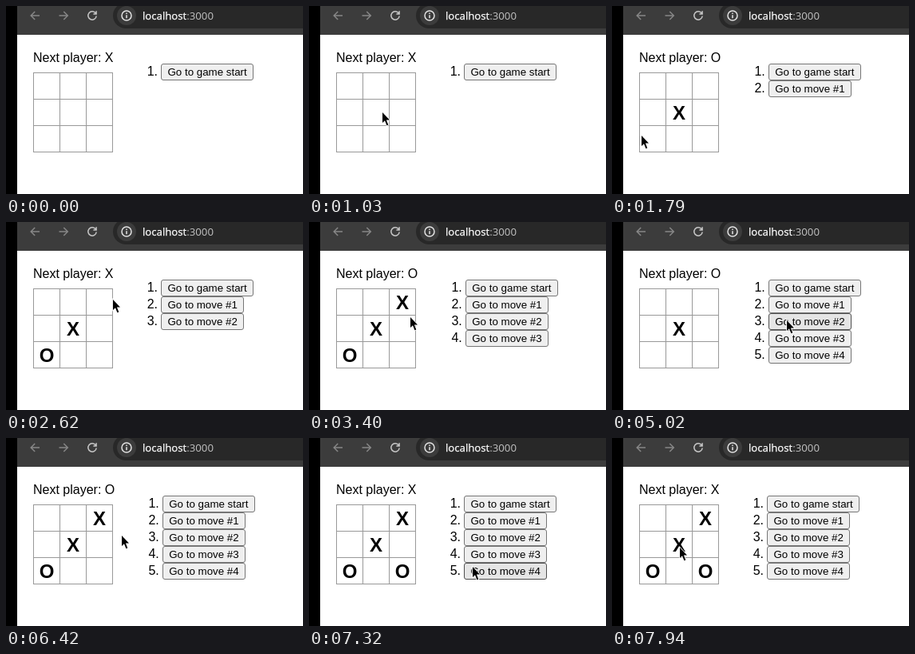
Animation of 372 by 235 pixels, one loop 8000 ms. Source, as an HTML page:

```html
<!DOCTYPE html>
<html lang="en">
<head>
<meta charset="utf-8">
<title>Tic-tac-toe history</title>
<style>
  html, body { margin: 0; width: 100%; height: 100%; overflow: hidden; background: #fff; }
  svg { display: block; }
  text { font-family: "Liberation Sans", Arial, sans-serif; font-size: 16px; fill: #000; white-space: pre; }
  .mark { font-size: 24px; font-weight: bold; text-anchor: middle; }
  .label { font-size: 13.333px; }
  .url { font-family: "Open Sans", sans-serif; font-size: 13.2px; fill: #c3c3c3; }
  .url .host { fill: #fff; stroke: #fff; stroke-width: 0.25; }
  .icon { fill: none; stroke-width: 1.5; }
  .btn { fill: #efefef; stroke: #767676; }
  .btn.hover { fill: #e5e5e5; stroke: #4f4f4f; }
  .btn.active { fill: #f5f5f5; stroke: #8d8d8d; }
</style>
</head>
<body>
<svg width="372" height="235" viewBox="0 0 372 235">
  <rect width="372" height="235" fill="#fff"/>
  <rect x="14" width="358" height="36" fill="#3c3c3c"/>
  <rect x="134" y="-4" width="280" height="32" rx="16" fill="#282828"/>
  <rect width="14" height="235" fill="#000"/>
  <g class="icon" stroke="#868686">
    <path d="M42 12H31.500M36.200 7L31.200 12L36.200 17"/>
    <path d="M66.500 12H77M72.300 7L77.300 12L72.300 17"/>
  </g>
  <path class="icon" stroke="#c7c7c7" d="M112.300 9A5.200 5.200 0 1 0 113.200 12.500M113.100 6.300V10H109.400"/>
  <circle cx="151" cy="12" r="12" fill="#3c3c3c"/>
  <g class="icon" stroke="#e3e3e3">
    <circle cx="151" cy="12" r="6"/>
    <path d="M151 11.200V15.200M151 8.400V9.900"/>
  </g>
  <text class="url" x="171" y="17"><tspan class="host">localhost</tspan>:3000</text>
  <text id="status" x="34" y="70"></text>
  <path id="grid" fill="none" stroke="#999"/>
  <g id="marks"></g>
  <g id="list"></g>
  <path id="cursor" d="M0 0V13L3 10.300L5.400 16.300L7.300 15.500L4.900 9.600H9Z"
        fill="#000" stroke="#fff" stroke-width="1.600" paint-order="stroke"/>
</svg>
<script>
  const LOOP = 8000, CELL = 33, ROW = 21, TOP = 72;
  const PRESS = 70;                      // how long a button stays down

  // Spots are centres of cells and buttons, with an offset
  const cell = (i, dx, dy) => ({ cell: i, x: 51 + i % 3 * CELL + dx, y: 100 + Math.floor(i / 3) * CELL + dy });
  const row = (i, dx, dy) => ({ row: i, x: 217 + dx, y: TOP + (i + 0.5) * ROW + dy });

  const keys = [], plays = [], clicks = [];
  const states = [{ t: 0, shown: 0, made: 0 }];

  function move(t, spot, bow = 0) {
    keys.push({ t, spot, bow });
  }

  function wait(t) {
    move(t, keys[keys.length - 1].spot);
  }

  function click(t) {
    wait(t);
    const { spot } = keys[keys.length - 1];
    if ("cell" in spot) plays.push(spot.cell);
    const made = plays.length;
    states.push({ t, made, shown: spot.row ?? made });
    clicks.push(t);
  }

  move(400, { x: 247, y: 202 });
  move(1160, cell(4, -5, -2), -14);
  click(1300);
  move(1790, cell(6, -14, -4), 22);
  click(2130);
  move(2620, cell(2, 17, -3));
  wait(2820);
  move(2890, cell(2, 12, -3));
  click(3090);
  move(3890, cell(8, 6, -3));
  click(4130);
  move(4700, row(1, 8, 2));
  click(4860);
  move(5020, row(2, 2, -2));
  move(5210, row(4, 0, -8));
  wait(5480);
  move(5550, row(3, 0, 4));
  click(5880);
  move(6080, row(3, -6, 0));
  wait(6280);
  move(6420, { x: 145, y: 122 });
  move(6600, cell(4, 0, 8));
  move(6980, row(4, 0, -7));
  click(7180);
  move(7940, cell(4, 1, 4), 14);

  const $ = id => document.getElementById(id);

  function add(parent, tag, attrs, text = "") {
    const el = document.createElementNS("http://www.w3.org/2000/svg", tag);
    for (const key in attrs) el.setAttribute(key, attrs[key]);
    el.textContent = text;
    parent.appendChild(el);
    return el;
  }

  let grid = "";
  for (let i = 0; i < 4; i++) {
    const d = i * CELL + 0.5;
    grid += `M34 ${83 + d}h100M${34 + d} 83v100`;
  }
  $("grid").setAttribute("d", grid);

  const marks = plays.map((n, i) => {
    const { x, y } = cell(n, 0, 9);
    return add($("marks"), "text", { class: "mark", x, y }, i % 2 ? "O" : "X");
  });

  const rows = [...Array(plays.length + 1).keys()].map(i => {
    const g = add($("list"), "g", {});
    const y = TOP + i * ROW, width = i ? 104 : 116;
    const num = add(g, "text", { y: y + 15 }, i + 1 + ".");
    const box = add(g, "rect", { y: y + 0.5, width: width - 1, height: ROW - 1, rx: 2.5 });
    const label = add(g, "text", { class: "label", y: y + 15 }, i ? "Go to move #" + i : "Go to game start");
    return { g, num, box, label, y, width };
  });

  function pointer(t) {
    if (t < keys[0].t) return [-50, -50];
    const i = keys.findIndex(k => k.t > t);
    const b = keys[i < 0 ? keys.length - 1 : i];
    if (i < 0) return [b.spot.x, b.spot.y].map(Math.round);
    const a = keys[i - 1];
    const k = (t - a.t) / (b.t - a.t), e = k * k * (3 - 2 * k);
    const mix = axis => a.spot[axis] + (b.spot[axis] - a.spot[axis]) * e;
    return [mix("x"), mix("y") + b.bow * Math.sin(Math.PI * e)].map(Math.round);
  }

  function draw(t) {
    const { shown, made } = states.filter(s => s.t <= t).pop();
    const [px, py] = pointer(t);
    const pressed = clicks.some(c => t >= c - PRESS && t < c);
    const left = shown % 2 ? 196.26 : 194.48;   // the list follows the status width
    const edge = Math.floor(left);

    $("status").textContent = "Next player: " + (shown % 2 ? "O" : "X");
    marks.forEach((m, i) => m.setAttribute("visibility", i < shown ? "visible" : "hidden"));
    rows.forEach((r, i) => {
      r.g.setAttribute("visibility", i <= made ? "visible" : "hidden");
      r.num.setAttribute("x", left - 17.8);
      r.box.setAttribute("x", edge + 0.5);
      r.label.setAttribute("x", left + 8);
      const over = px >= edge && px < edge + r.width && py >= r.y && py < r.y + ROW;
      r.box.setAttribute("class", "btn" + (over ? pressed ? " active" : " hover" : ""));
    });
    $("cursor").setAttribute("transform", `translate(${px} ${py})`);
  }

  const start = performance.now();
  function tick() {
    draw((performance.now() - start) % LOOP);
    requestAnimationFrame(tick);
  }
  tick();
</script>
</body>
</html>
```
